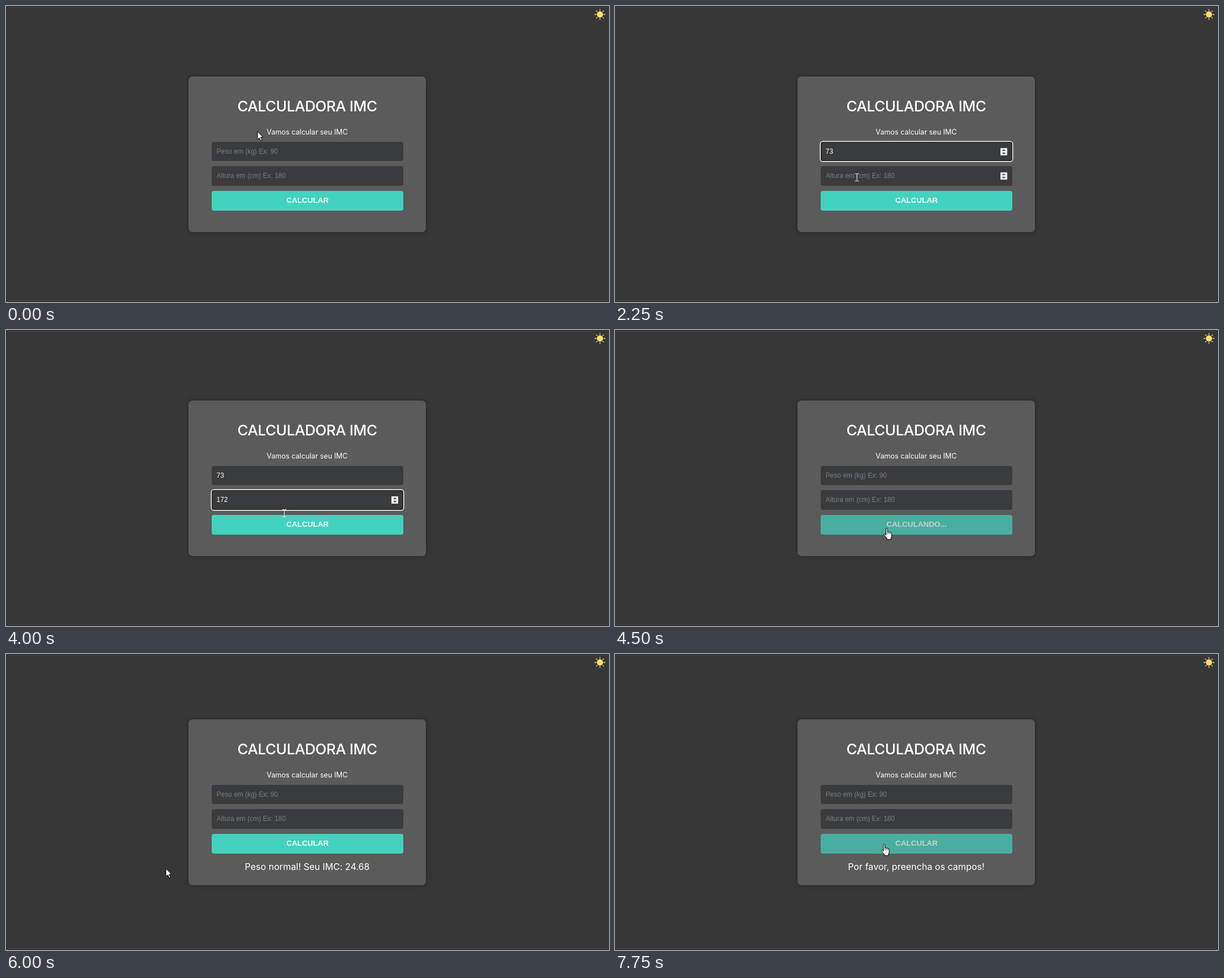
Animation, 1067 px wide and 525 px high, one loop 8000 ms. Source, as an HTML page:

```html
<!DOCTYPE html>
<html lang="pt-BR">
<head>
<meta charset="utf-8">
<title>Calculadora IMC</title>
<style>
  html, body { margin: 0; width: 100%; height: 100%; overflow: hidden; background: #373738; }
  body { position: relative; color: #fff; font-family: Inter, Roboto, sans-serif; }
  #sun { position: absolute; left: 1041px; top: 5px; }

  #card {
    position: absolute; left: 323px; top: 125px; width: 420px; height: 276px;
    border-radius: 7px; background: #5b5b5c; box-shadow: 0 0 9px rgba(0, 0, 0, .3);
  }
  #card.open { top: 116px; height: 294px; }
  h1, p { position: absolute; left: 0; width: 100%; margin: 0; text-align: center; white-space: nowrap; }
  h1 { top: 33px; font-size: 26px; line-height: 40px; font-weight: 500; letter-spacing: -.4px; }
  #intro { top: 89px; font-size: 12.6px; line-height: 20px; }
  #result { top: 249px; font-size: 16px; line-height: 25px; letter-spacing: .05px; }

  .field, #button {
    position: absolute; left: 41px; width: 339px; border-radius: 4px;
    line-height: 34px; font-family: "Liberation Sans", Arial, sans-serif;
  }
  .field {
    box-sizing: border-box; padding-left: 8.5px;
    background: #3a3b3c; font-size: 12px; white-space: nowrap;
  }
  #weight { top: 116px; height: 34px; }
  #height { top: 159px; height: 35px; line-height: 35px; }
  .field.focus { box-shadow: inset 0 0 0 1px #0d0d0e, 0 0 0 1.5px #fff; }
  .hint { color: #7d7d7e; }
  .caret {
    display: inline-block; width: 1px; height: 14px; margin-right: -1px;
    vertical-align: -3px; background: #fff; visibility: hidden;
  }
  .focus.blink .caret { visibility: visible; }
  .spin { position: absolute; left: 318px; top: 11px; visibility: hidden; }
  .hover .spin, .focus .spin { visibility: visible; }

  #button {
    top: 203px; height: 35px; background: #41d3be;
    font-size: 13.5px; font-weight: 700; text-align: center;
  }
  #button.hover { opacity: .7; }

  .cursor { position: absolute; left: 0; top: 0; overflow: visible; visibility: hidden; }
</style>
</head>
<body>
<svg id="sun" width="20" height="20" viewBox="-10 -10 20 20">
  <g id="rays" stroke="#f7dc8c" stroke-width="1.3" stroke-linecap="round"></g>
  <circle r="5.2" fill="#ffdf66" stroke="#f3cf62" stroke-width=".8"/>
</svg>

<div id="card">
  <h1>CALCULADORA IMC</h1>
  <p id="intro">Vamos calcular seu IMC</p>
  <div id="weight" class="field" data-hint="Peso em (kg) Ex: 90"></div>
  <div id="height" class="field" data-hint="Altura em (cm) Ex: 180"></div>
  <div id="button">CALCULAR</div>
  <p id="result"></p>
</div>

<svg class="cursor" id="arrow" width="12" height="19">
  <path d="M.5 .5V14.8L3.8 11.7L6.2 17.3L8.5 16.3L6.1 10.9H10.5Z" fill="#fff" stroke="#000"/>
</svg>
<svg class="cursor" id="beam" width="8" height="15">
  <path d="M-3.5 -6.5H-.7L0 -6L.7 -6.5H3.5M0 -6V6M-3.5 6.5H-.7L0 6L.7 6.5H3.5" fill="none" stroke="#eee"/>
</svg>
<svg class="cursor" id="hand" width="16" height="22">
  <path d="M4.5 13V2Q4.5 .5 5.8 .5T7.2 2V7.2Q7.6 6.3 8.7 6.5T9.8 7.8Q10.3 7 11.3 7.2T12.4 8.6
    Q12.8 8 13.7 8.3T14.6 9.6V14Q14.6 16 13.2 18V20.5H6V18.2Q3.8 15.6 1 12.2Q.3 11 1.3 10.4T3.2 11.2Z"
    fill="#fff" stroke="#000"/>
  <path d="M7.2 7V11M9.8 8V11M12.4 8.6V11" stroke="#000" stroke-width=".8"/>
</svg>

<script>
  const LOOP = 8000;
  const $ = id => document.getElementById(id);

  $('rays').innerHTML = [...Array(8).keys()]
    .map(i => `<path d="M0 -7V-9" transform="rotate(${i * 45})"/>`).join('');

  for (const id of ['weight', 'height']) {
    $(id).innerHTML = `<span class="value"></span><i class="caret"></i><span class="hint"></span>
      <svg class="spin" width="12" height="13">
        <rect width="12" height="13" fill="#efefef"/>
        <path d="M3 5L6 2L9 5ZM3 8L6 11L9 8Z" fill="#444"/>
      </svg>`;
  }

  // Each step overrides part of the state from its time on.
  const at = (cursor, x, y) => ({ cursor, x, y });
  const steps = [
    [0, { ...at('arrow', 444.5, 222), weight: '', height: '', label: 'CALCULAR', result: '',
          hover: '', focus: '', blink: false }],
    [250, { ...at('beam', 442, 249), hover: 'weight' }],
    [500, at('beam', 432, 261)],
    [750, { focus: 'weight', blink: true }],
    [1250, { blink: false }],
    [1500, { weight: '7', blink: true }],
    [1750, { weight: '73' }],
    [2250, { ...at('beam', 428, 304), hover: 'height', blink: false }],
    [2500, { focus: 'height', blink: true }],
    [3000, { height: '1' }],
    [3250, { height: '17' }],
    [3500, { height: '172' }],
    [4000, { ...at('beam', 492.5, 325), hover: '', blink: false }],
    [4250, { ...at('hand', 475, 351), hover: 'button' }],
    [4500, { weight: '', height: '', focus: '', label: 'CALCULANDO...' }],
    [4750, { ...at('arrow', 284, 380), hover: '' }],
    [5000, at('arrow', 282.5, 380)],
    [6000, { label: 'CALCULAR', result: 'Peso normal! Seu IMC: 24.68' }],
    [6250, at('arrow', 282.5, 371)],
    [6500, at('arrow', 301, 304)],
    [6750, at('arrow', 280.5, 363)],
    [7000, { ...at('hand', 466, 349), hover: 'button' }],
    [7250, at('hand', 487, 338)],
    [7500, at('hand', 470.5, 337)],
    [7750, { result: 'Por favor, preencha os campos!' }]
  ];

  const stateAt = t =>
    Object.assign({}, ...steps.filter(([start]) => start <= t).map(([, change]) => change));

  function drawField(id, s) {
    const field = $(id);
    field.classList.toggle('hover', s.hover === id);
    field.classList.toggle('focus', s.focus === id);
    field.classList.toggle('blink', s.blink);
    field.querySelector('.value').textContent = s[id];
    field.querySelector('.hint').textContent = s[id] ? '' : field.dataset.hint;
  }

  function draw(t) {
    const s = stateAt(t);
    drawField('weight', s);
    drawField('height', s);
    $('button').textContent = s.label;
    $('button').classList.toggle('hover', s.hover === 'button');
    $('result').textContent = s.result;
    $('card').classList.toggle('open', s.result !== '');
    for (const id of ['arrow', 'beam', 'hand']) {
      $(id).style.visibility = id === s.cursor ? 'visible' : 'hidden';
      $(id).style.transform = `translate(${s.x}px, ${s.y}px)`;
    }
  }

  const begin = performance.now();
  function tick() {
    draw((performance.now() - begin) % LOOP);
    requestAnimationFrame(tick);
  }
  tick();
</script>
</body>
</html>
```
